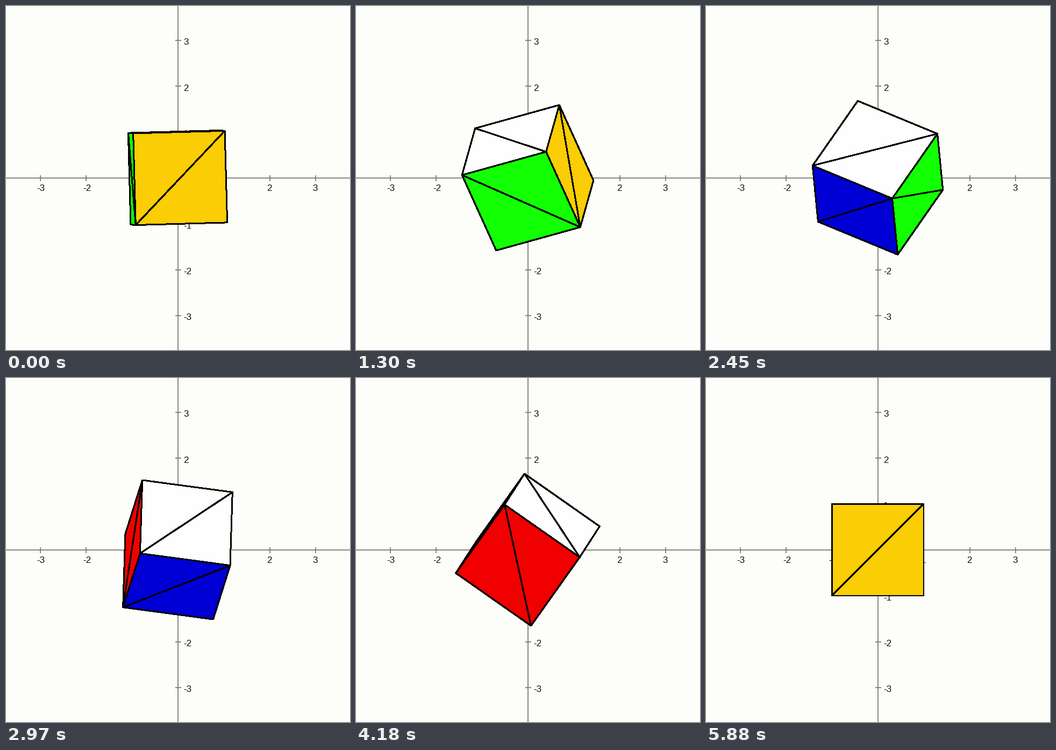
A matplotlib script for the animation above (5910 ms loop, 640 by 640 pixels).

```python
import numpy as np
import matplotlib.pyplot as plt
from matplotlib.animation import FuncAnimation
from matplotlib.collections import LineCollection, PolyCollection

SIZE = 640
HALF = SIZE / 2
UNIT = SIZE / 7.5
TICK_MS, LOOP_MS = 10, 5910
STEP_MS = 28.81
STEPS_PER_TURN = 206
PX = 0.72  # points per pixel at 100 dpi

PAPER, GRAY, INK = "#fdfdfa", "#7c7c70", "#101010"
SIDES = ["#facd04", "#f00000", "#0000d4", "#12ff04"]  # front, right, back, left
CAP = "#fefefe"
X, Y, Z = np.eye(3)
AXIS = np.array([0.2, 2, 1])
AXIS /= np.linalg.norm(AXIS)


def make_face(normal, right, up, first=0):
    """Square split along the diagonal that starts at the given corner."""
    signs = [(-1, -1), (1, -1), (1, 1), (-1, 1)]
    quad = [normal + a * right + b * up for a, b in signs]
    return np.roll(quad, first, axis=0)


def make_cube():
    faces = [(CAP, make_face(-Y, X, Z)), (CAP, make_face(Y, X, -Z))]
    normal, right = Z, X
    for i, color in enumerate(SIDES):
        faces.append((color, make_face(normal, right, Y, i % 2)))
        normal, right = right, -normal
    return faces


def rotation(angle):
    """Rodrigues rotation about AXIS."""
    x, y, z = AXIS
    cross = np.array([[0, -z, y], [z, 0, -x], [-y, x, 0]])
    return np.eye(3) + np.sin(angle) * cross + (1 - np.cos(angle)) * cross @ cross


fig = plt.figure(figsize=(SIZE / 100, SIZE / 100), dpi=100, facecolor=PAPER)
ax = fig.add_axes([0, 0, 1, 1])
ax.set_xlim(-HALF, HALF)
ax.set_ylim(-HALF, HALF)
ax.axis("off")


def draw_grid():
    lines = [[(-HALF, 0), (HALF, 0)], [(0, -HALF), (0, HALF)]]
    style = dict(family="Liberation Sans", size=12.3, color=INK, va="baseline")
    for n in (-3, -2, -1, 1, 2, 3):
        p = n * UNIT
        lines += [[(p, -5.5), (p, 5.5)], [(-5.5, p), (5.5, p)]]
        ax.text(p + (1 if n < 0 else -0.5), -24.5, str(n), ha="center", **style)
        ax.text(10, p - 8.5, str(n), ha="left", **style)
    ax.add_collection(LineCollection(lines, colors=GRAY, linewidths=1.8 * PX, zorder=1))


draw_grid()
faces = make_cube()
cube = PolyCollection([], edgecolors="black", linewidths=2 * PX,
                      joinstyle="round", antialiaseds=False, zorder=5)
ax.add_collection(cube, autolim=False)


def update(tick):
    step = int((tick * TICK_MS + 5) / STEP_MS)
    turn = rotation(2 * np.pi * (step + 2) / STEPS_PER_TURN)
    tris, colors = [], []
    for color, quad in faces:
        pts = quad @ turn.T
        if pts[:, 2].mean() > 1e-9:
            flat = pts[:, :2] * UNIT + (-0.5, 0.5)
            tris += [flat[[0, 1, 2]], flat[[0, 2, 3]]]
            colors += [color] * 2
    cube.set_verts(tris)
    cube.set_facecolor(colors)
    return [cube]


anim = FuncAnimation(fig, update, frames=LOOP_MS // TICK_MS, interval=TICK_MS,
                     repeat=True, repeat_delay=0, cache_frame_data=False)
plt.show()
```
